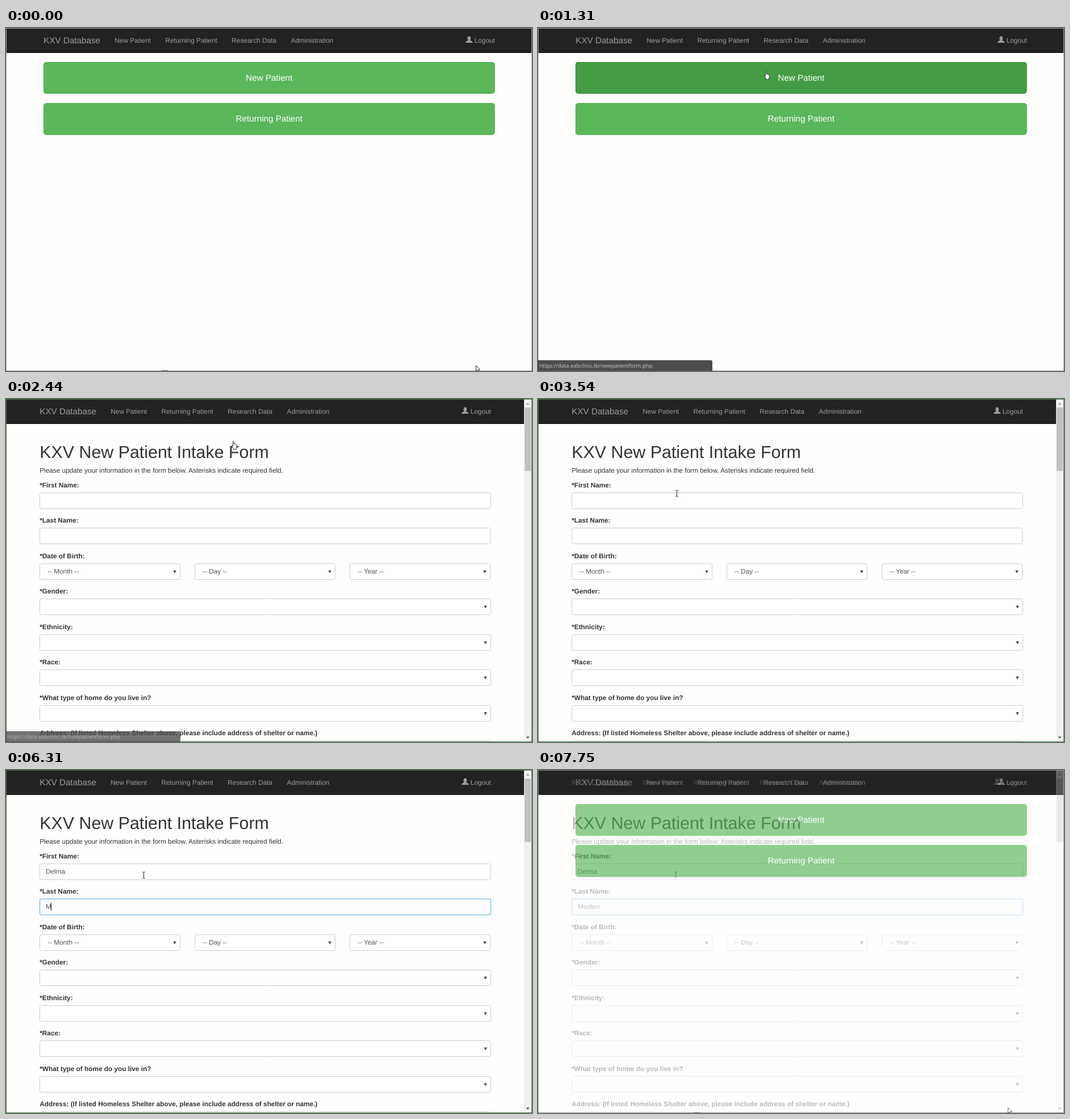
These frames come from a looping animation (926x605 px, 7.82 s). An HTML page with a canvas:

```html
<!DOCTYPE html>
<html lang="en">
<head>
<meta charset="utf-8">
<title>Patient intake</title>
<style>
html, body { margin: 0; width: 100%; height: 100%; overflow: hidden; background: #fefefd; }
canvas { position: absolute; left: 0; top: 0; width: 926px; height: 605px; }
</style>
</head>
<body>
<canvas id="form" width="926" height="605"></canvas>
<canvas id="home" width="926" height="605"></canvas>
<script>
const W = 926, H = 605, LOOP = 7820;
const SANS = '"Liberation Sans", Arial, sans-serif';
const ZOOM = 0.8446;
const BODY = 14 * ZOOM, LARGE = 18 * ZOOM, TITLE = 36 * ZOOM;
const LOAD = 2120, PRESS = 1950, FADE = 7680;

const layers = {};
for (const id of ['home', 'form']) {
  const el = document.getElementById(id);
  layers[id] = { el, ctx: el.getContext('2d') };
}
let ctx;

const clamp = v => Math.max(0, Math.min(1, v));
const ramp = (t, a, b) => clamp((t - a) / (b - a));
const smooth = u => u * u * (3 - 2 * u);
const mix = (a, b, u) => a + (b - a) * u;

function along(points, t) {
  if (t <= points[0][0]) return points[0].slice(1);
  for (let i = 1; i < points.length; i++) {
    const [t1, x1, y1] = points[i];
    if (t < t1) {
      const [t0, x0, y0] = points[i - 1];
      const u = (t - t0) / (t1 - t0);
      return [mix(x0, x1, u), mix(y0, y1, u)];
    }
  }
  return points[points.length - 1].slice(1);
}

function text(str, x, y, size, color, opt = {}) {
  ctx.font = `${opt.bold ? 'bold ' : ''}${size}px ${opt.family || SANS}`;
  ctx.textRendering = 'geometricPrecision';
  ctx.textAlign = opt.align || 'left';
  ctx.fillStyle = color;
  ctx.fillText(str, x, y);
  return ctx.measureText(str).width;
}

function rect(x, y, w, h, color) {
  ctx.fillStyle = color;
  ctx.fillRect(x, y, w, h);
}

function box(x, y, w, h, r) {
  ctx.beginPath();
  ctx.roundRect(x, y, w, h, r);
}

function poly(points, color) {
  ctx.beginPath();
  points.forEach(([x, y]) => ctx.lineTo(x, y));
  ctx.closePath();
  ctx.fillStyle = color;
  ctx.fill();
}

function userIcon(x, y) {
  ctx.fillStyle = '#9d9d9d';
  ctx.beginPath();
  ctx.ellipse(x + 6.2, y + 3.8, 2.9, 3.8, 0, 0, 7);
  ctx.fill();
  ctx.beginPath();
  ctx.moveTo(x, y + 11.5);
  ctx.quadraticCurveTo(x, y + 9.2, x + 2.2, y + 8.6);
  ctx.quadraticCurveTo(x + 4.8, y + 7.8, x + 4.8, y + 6);
  ctx.lineTo(x + 7.6, y + 6);
  ctx.quadraticCurveTo(x + 7.6, y + 7.8, x + 10.2, y + 8.6);
  ctx.quadraticCurveTo(x + 12.4, y + 9.2, x + 12.4, y + 11.5);
  ctx.fill();
}

function navbar(left, width) {
  rect(0, 0, width, 44, '#222');
  rect(0, 43, width, 1, '#0c0c0c');
  const gray = '#9d9d9d';
  text('KXV Database', left, 27, LARGE, gray);
  const links = [['New Patient', 125], ['Returning Patient', 214.2],
                 ['Research Data', 331], ['Administration', 435.2]];
  for (const [name, dx] of links) text(name, left + dx, 25.5, BODY, gray);
  userIcon(left + 742.8, 14.5);
  text('Logout', left + 794.5, 25.5, BODY, gray, { align: 'right' });
}

function frame(color) {
  ctx.strokeStyle = color;
  ctx.lineWidth = 1;
  ctx.strokeRect(0.5, 0.5, W - 1, H - 1);
}

const BUTTON = {
  idle: ['#5ab75a', '#4cae4c'],
  hover: ['#449d44', '#398439'],
  active: ['#398439', '#255625']
};

function button(label, y, state) {
  const [fill, edge] = BUTTON[state];
  box(66, y, 794.5, 56, 5);
  ctx.fillStyle = fill;
  ctx.fill();
  if (state === 'active') {
    const g = ctx.createLinearGradient(0, y, 0, y + 6);
    g.addColorStop(0, 'rgba(0,0,0,.16)');
    g.addColorStop(1, 'rgba(0,0,0,0)');
    ctx.fillStyle = g;
    ctx.fill();
  }
  box(66.5, y + 0.5, 793.5, 55, 4.5);
  ctx.strokeStyle = edge;
  ctx.lineWidth = 0.85;
  ctx.stroke();
  text(label, 463.3, y + 32.5, LARGE, '#fff', { align: 'center' });
}

function statusBar(t) {
  const a = ramp(t, 1110, 1290) * (1 - ramp(t, 2390, 2630));
  if (!a) return;
  ctx.globalAlpha = a;
  box(0, 586, 307, 19, [0, 3, 0, 0]);
  ctx.fillStyle = '#4d4d4d';
  ctx.fill();
  text('https://data.eabclinic.tk/newpatientform.php', 2.5, 599, 9.5, '#c8c8c8',
    { family: '"Open Sans", "Noto Sans", sans-serif' });
  ctx.globalAlpha = 1;
}

function outlined(path) {
  ctx.fillStyle = '#fff';
  ctx.strokeStyle = '#111';
  ctx.lineWidth = 0.9;
  ctx.lineJoin = 'round';
  ctx.fill(path);
  ctx.stroke(path);
}

const ARROW = new Path2D('M.4.5V10.6L2.8 8.4 4.4 12 6 11.3 4.5 7.8H7.6Z');
const HAND = new Path2D('M2.6 9V1.6Q2.6.5 3.5.5T4.4 1.6V5Q5.9 4.6 6.1 5.6 7.5 5.2 7.7 6.2 9.2 6 9.2 7.4V10.6Q9.2 12 8.2 13.2V15H3.6V13.4Q2.4 12 .6 9.2.2 8 1.2 7.9 2 8 2.6 9Z');
const BEAM = new Path2D('M-2.5-5.5H-.6M.6-5.5H2.5M0-5V5M-2.5 5.5H-.6M.6 5.5H2.5');

function cursor(kind, x, y) {
  ctx.save();
  ctx.translate(Math.round(x), Math.round(y));
  if (kind === 'arrow') outlined(ARROW);
  else if (kind === 'hand') {
    ctx.translate(-3, -1);
    outlined(HAND);
  } else {
    ctx.translate(0.5, 0.5);
    ctx.strokeStyle = '#222';
    ctx.lineWidth = 1;
    ctx.stroke(BEAM);
  }
  ctx.restore();
}

function drawHome(t) {
  const a = smooth(ramp(t, 20, 860)), b = smooth(ramp(t, 860, 1380));
  const x = mix(827, 423, a) - 23 * b;
  const y = mix(595, 126, a) - 51 * b;
  const onNew = y < 115, onReturning = y > 133 && y < 188;

  rect(0, 0, W, H, '#fefefd');
  navbar(66.3, W);
  button('New Patient', 60, t >= PRESS ? 'active' : onNew ? 'hover' : 'idle');
  button('Returning Patient', 132.5, onReturning ? 'hover' : 'idle');
  frame(t >= PRESS ? '#3a843a' : '#a6a6a6');
  rect(274, 604, 12, 1, '#444');
  statusBar(t);
  cursor(onNew || onReturning ? 'hand' : 'arrow', x, y);
}

const LABELS = ['*First Name:', '*Last Name:', '*Date of Birth:', '*Gender:', '*Ethnicity:',
  '*Race:', '*What type of home do you live in?',
  'Address: (If listed Homeless Shelter above, please include address of shelter or name.)'];

// Focus interval, key times and the idle caret's first blink
const ENTRIES = [
  { word: 'Delma', from: 3860, to: 5750, keys: [4630, 5050, 5190, 5310, 5440], blink: 4410 },
  { word: 'Modlen', from: 5750, to: LOOP, keys: [6310, 6550, 6630, 6810, 6910, 7010], blink: 6230 }
];

function field(x, y, w, glow = 0) {
  box(x + 0.5, y + 0.5, w, 28, 3);
  ctx.fillStyle = '#fff';
  ctx.fill();
  ctx.lineWidth = 1;
  ctx.strokeStyle = '#ccc';
  ctx.stroke();
  if (!glow) return;
  ctx.save();
  ctx.globalAlpha = glow;
  ctx.shadowColor = 'rgba(102,175,233,.6)';
  ctx.shadowBlur = 6;
  ctx.strokeStyle = '#66afe9';
  ctx.stroke();
  ctx.restore();
}

function select(x, y, w, label) {
  field(x, y, w);
  const r = x + w - 9, m = y + 12.5;
  poly([[r - 2.8, m], [r + 2.8, m], [r, m + 5]], '#444');
  if (label) text(label, x + 14, y + 18, BODY, '#555');
}

function entry(e, y, t) {
  const glow = ramp(t, e.from, e.from + 130) * (1 - ramp(t, e.to, e.to + 120));
  field(59, y, 794, glow);
  const typed = e.keys.filter(k => t >= k).length;
  const w = text(e.word.slice(0, typed), 70, y + 18, BODY, '#555');
  if (t < e.from || t >= e.to) return;
  const since = typed ? t - e.keys[typed - 1] : t - e.blink + 530;
  const lit = typed ? since < 530 : t < e.blink;
  if (lit) rect(Math.floor(70 + w), y + 7, 1, 14, '#222');
}

function scrollbar() {
  rect(912, 1, 13, 603, '#f1f1f1');
  rect(913, 15, 11, 112, '#c1c1c1');
  poly([[915.5, 10], [921.5, 10], [918.5, 6.5]], '#a3a3a3');
  poly([[915.5, 595.5], [921.5, 595.5], [918.5, 599]], '#505050');
}

const FORM_PATH = [[2950, 400, 75], [3100, 385, 84], [3220, 345, 108], [3380, 283, 145],
  [3540, 244, 166], [3660, 232, 173], [3740, 230, 175], [3800, 236, 181], [3900, 242, 185]];

function drawForm(t) {
  rect(0, 0, W, H, '#fefefd');
  navbar(59.3, 912);
  text('KXV New Patient Intake Form', 59.2, 104, TITLE, '#333');
  text('Please update your information in the form below. Asterisks indicate required field.',
    59.2, 130, BODY, '#333');

  LABELS.forEach((label, i) => {
    const dy = Math.floor(62.5 * i), y = 165 + dy;
    text(label, 59.2, 156 + dy, BODY, '#333', { bold: true });
    if (i < 2) entry(ENTRIES[i], y, t);
    else if (i === 2) {
      ['Month', 'Day', 'Year'].forEach((s, k) => select(59 + 273 * k, y, 247, `-- ${s} --`));
    } else if (i < 7) select(59, y, 794);
    else field(59, y, 794);
  });

  scrollbar();
  frame('#3a843a');
  statusBar(t);

  const [x, y] = along(FORM_PATH, t);
  const overText = y < 112 || (y > 118 && y < 134) || y > 163;
  cursor(t < 3000 ? 'hand' : overText ? 'beam' : 'arrow', x, y);
}

function paint(name, draw, t, opacity) {
  const { el, ctx: c } = layers[name];
  el.style.opacity = opacity;
  if (!opacity) return;
  ctx = c;
  draw(t);
}

const start = performance.now();
function tick() {
  const t = (performance.now() - start) % LOOP;
  const fade = t < FADE ? 0 : t < 7750 ? 1 / 3 : 2 / 3;
  paint('form', drawForm, t, t >= LOAD ? 1 : 0);
  if (t < LOAD) paint('home', drawHome, t, 1);
  else paint('home', drawHome, 0, fade);
  requestAnimationFrame(tick);
}
tick();
</script>
</body>
</html>
```
